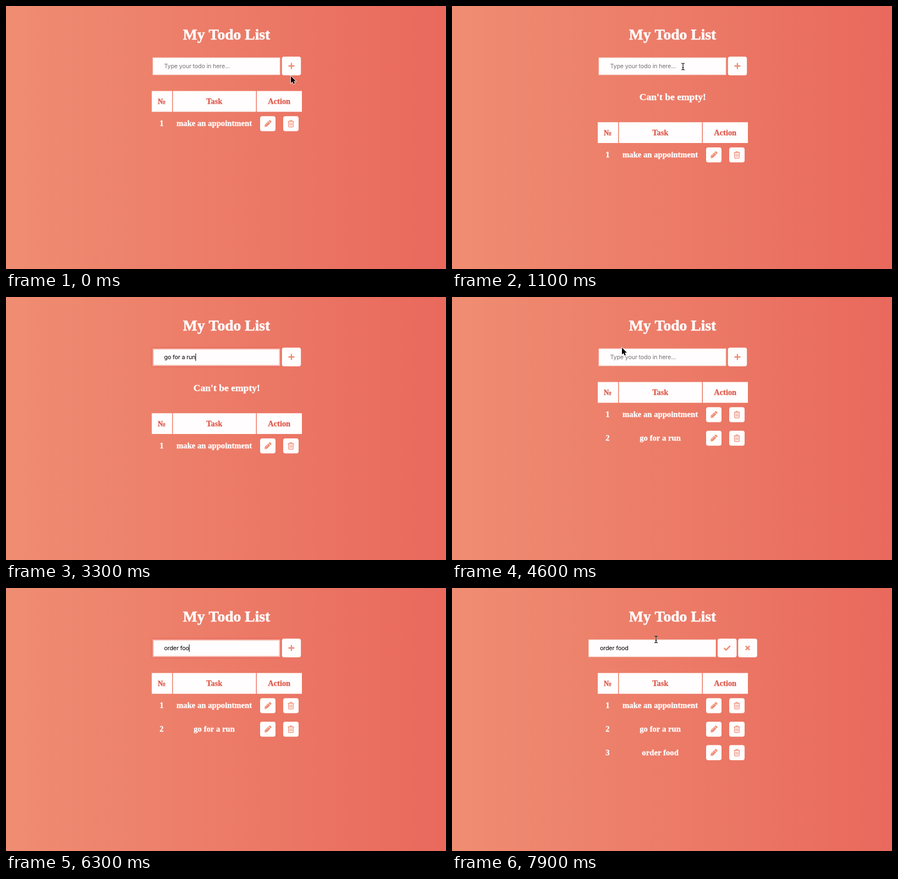
Animation of 800 by 478 pixels, one loop 8000 ms. Source, as an HTML page with a canvas:

```html
<!DOCTYPE html>
<html lang="en">
<head>
<meta charset="utf-8">
<title>My Todo List</title>
<style>
  html, body { margin: 0; width: 100%; height: 100%; overflow: hidden; }
  canvas { display: block; }
</style>
</head>
<body>
<canvas id="stage" width="800" height="478"></canvas>
<script>
const ctx = document.getElementById('stage').getContext('2d');
const LOOP = 8000, STEP = 100;
const CORAL = '#ef8b74', RED = '#df5d4f';

const background = ctx.createLinearGradient(0, 0, 800, 0);
background.addColorStop(0, '#ef8d72');
background.addColorStop(1, '#e9695d');

// Pointer runs: [time, x, y] stops; the pointer is hidden between runs.
const pointerRuns = [
  [[0, 518, 128], [300, 519, 108], [500, 519, 108], [700, 512, 109], [800, 512, 109],
   [1100, 420, 110], [1300, 416, 110], [1700, 416, 110], [2400, 410, 112]],
  [[4400, 392, 104], [4600, 309, 92.6], [4800, 313, 106], [5300, 316, 109]],
  [[6700, 318, 110], [6900, 392, 166], [7100, 475, 214], [7300, 477, 298],
   [7500, 476, 300], [7600, 468, 272], [7900, 371, 93.4]]
];

const lerp = (a, b, k) => a + (b - a) * k;

function pointerAt(t) {
  const run = pointerRuns.find(r => t >= r[0][0] && t <= r.at(-1)[0]);
  if (!run) return null;
  const i = Math.max(1, run.findIndex(stop => stop[0] >= t));
  const [t0, x0, y0] = run[i - 1], [t1, x1, y1] = run[i];
  const k = (t - t0) / (t1 - t0);
  return [lerp(x0, x1, k), lerp(y0, y1, k)];
}

function typedAt(t) {
  if (t >= 2500 && t < 3500) {
    return 'go for a run'.slice(0, 1 + Math.round((Math.min(t, 3300) - 2500) / 800 * 11));
  }
  if (t >= 5400 && t < 6600) {
    const count = t <= 6100 ? Math.min(7, (t - 5300) / STEP) : (t - 5400) / STEP;
    return 'order food'.slice(0, count);
  }
  return t >= 7500 ? 'order food' : '';
}

function box(x, y, w, h, radius = 0, color = '#fffdfd') {
  ctx.fillStyle = color;
  ctx.beginPath();
  ctx.roundRect(x, y, w, h, radius);
  ctx.fill();
}

function serif(text, x, y, size, color = '#fffdfd') {
  ctx.font = `bold ${size}px "Liberation Serif", serif`;
  ctx.textAlign = 'center';
  ctx.letterSpacing = '0px';
  ctx.fillStyle = ctx.strokeStyle = color;
  ctx.lineWidth = size / 45;
  ctx.fillText(text, x, y);
  ctx.strokeText(text, x, y);
}

function at(x, y, draw) {
  ctx.save();
  ctx.translate(x, y);
  draw();
  ctx.restore();
}

function strokePath(d, width, color = CORAL) {
  ctx.strokeStyle = color;
  ctx.lineWidth = width;
  ctx.stroke(new Path2D(d));
}

const icons = {
  plus: () => strokePath('M-5.5 0H5.5M0-5.5V5.5', 2.3),
  check: () => strokePath('M-5.5 .2L-2 3.7L5.5-3.8', 2.6),
  cross: () => strokePath('M-3.6-3.6L3.6 3.6M3.6-3.6L-3.6 3.6', 2.6),
  pencil() {
    ctx.rotate(-Math.PI / 4);
    ctx.fillStyle = CORAL;
    ctx.fill(new Path2D('M-8.2 0L-5-2.6H3.7V2.6H-5ZM4.6-2.6H6.2Q7.6-2.6 7.6-1.2V1.2Q7.6 2.6 6.2 2.6H4.6Z'));
    strokePath('M-6.3 0H-4.6M-3.5-1.1H2.6', .7, '#fffdfd');
  },
  trash() {
    strokePath('M-5.6-4H5.6M-2.4-4L-1.7-6H1.7L2.4-4M-4.3-4V4.8Q-4.3 6-3.1 6H3.1Q4.3 6 4.3 4.8V-4', 1.2);
    strokePath('M-2-1.7V3.8M0-1.7V3.8M2-1.7V3.8', .95);
  }
};

function button(icon, x, y, w, h) {
  box(x, y, w, h, 4);
  at(x + w / 2, y + h / 2, icons[icon]);
}

function input(x, text, focused, caret) {
  if (focused) {
    ctx.save();
    ctx.shadowColor = '#e5554b';
    ctx.shadowBlur = 4;
    box(x - .5, 93.5, 232, 32, 1, '#f6b9b0');
    ctx.restore();
    box(x + 1.5, 95.5, 228, 28);
  } else {
    box(x - .5, 93.5, 232, 32, 0, '#f6d2ca');
    box(x + .5, 94.5, 230, 30);
  }
  ctx.font = '10.8px Inter, sans-serif';
  ctx.letterSpacing = '-0.2px';
  ctx.textAlign = 'left';
  ctx.fillStyle = text ? '#000' : '#757575';
  ctx.fillText(text || 'Type your todo in here...', x + 20.5, 113.3);
  if (caret) box(x + 20.5 + ctx.measureText(text).width, 102.5, 1, 13.5, 0, '#000');
}

function table(y, tasks) {
  [['№', 265, 37], ['Task', 303.5, 151], ['Action', 456, 82]].forEach(([label, x, w]) => {
    box(x, y, w, 37.8);
    serif(label, x + w / 2 - .3, y + 23.6, 14.4, RED);
  });
  tasks.forEach((task, i) => {
    const top = y + 45.7 + i * 42.7;
    serif(i + 1, 283, top + 18, 14.6);
    serif(task, 378.6, top + 18, 14.7);
    button('pencil', 462, top, 28, 27.4);
    button('trash', 504, top, 28, 27.4);
  });
}

function pointer(x, y, inInput) {
  at(x, y, () => {
    if (inInput) {
      const beam = 'M-3-6Q0-6 0-4.5Q0-6 3-6M0-5V5M-3 6Q0 6 0 4.5Q0 6 3 6M-1.5 1.8H1.5';
      strokePath(beam, 2.2, '#ffffffb0');
      strokePath(beam, 1.1, '#000');
    } else {
      const arrow = 'M0-.5V12L2.9 9.4L4.8 13.7L7 12.8L5.1 8.6H9Z';
      strokePath(arrow, 1.5, '#fff');
      ctx.fillStyle = '#000';
      ctx.fill(new Path2D(arrow));
    }
  });
}

function draw(t) {
  const error = t >= 400 && t < 3500;
  const editing = t >= 7500;
  const focusStart = t >= 1200 && t < 3500 ? 1200 : t >= 5000 && t < 6600 ? 5000 : null;
  const focused = focusStart !== null;
  const text = typedAt(t);
  const caret = focused && (text !== '' || (t - focusStart) % 1000 < 500);
  const tasks = ['make an appointment', 'go for a run', 'order food']
    .slice(0, t >= 6600 ? 3 : t >= 3500 ? 2 : 1);
  const inputX = editing ? 248.5 : 267;

  ctx.fillStyle = background;
  ctx.fillRect(0, 0, 800, 478);
  serif('My Todo List', 401, 61, 27.6);
  input(inputX, text, focused, caret);
  if (editing) {
    button('check', 483, 92, 34.5, 34);
    button('cross', 520.3, 92, 34.5, 34);
  } else {
    button('plus', 501.7, 92, 34.5, 34);
  }
  if (error) serif("Can't be empty!", 401.3, 171, 17.6);
  table(error ? 211.2 : 154.5, tasks);

  const position = pointerAt(t);
  if (position) {
    const [x, y] = position;
    pointer(x, y, x > inputX && x < inputX + 231 && y > 93 && y < 125);
  }
}

function tick() {
  draw(Math.floor(performance.now() % LOOP / STEP) * STEP);
  requestAnimationFrame(tick);
}
tick();
</script>
</body>
</html>
```
